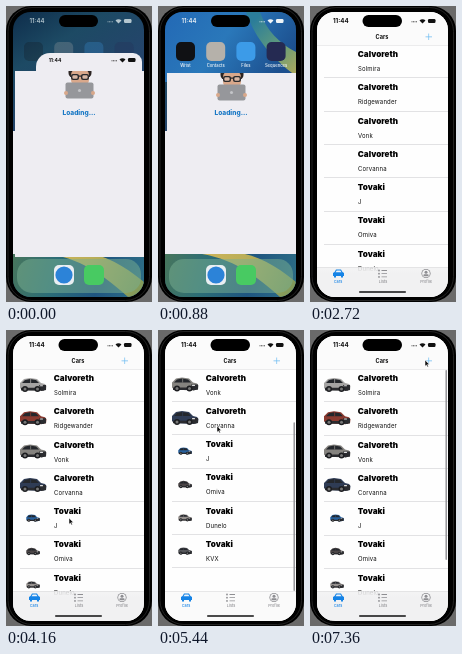
Recreate the animation shown at these times as an HTML page with a canvas. Size 146 by 296 pixels, loop 8000 ms.

```html
<!DOCTYPE html>
<html lang="en">
<head>
<meta charset="utf-8">
<style>
html, body { margin: 0; width: 100%; height: 100%; overflow: hidden; background: #000; }
canvas { display: block; width: 146px; height: 296px; }
</style>
</head>
<body>
<canvas id="stage"></canvas>
<script>
const canvas = document.getElementById('stage');
const c = canvas.getContext('2d');
const dpr = window.devicePixelRatio || 1;
canvas.width = 146 * dpr;
canvas.height = 296 * dpr;

const LOOP = 8000, STEP = 80, ROW = 33.3, TOP = 39, TAB = 261;
const SCREEN = [7, 6, 131, 285];
const BLUE = '#1583e6', GRAY = '#8e8e92';
const cars = [
  ['Calvoreth', 'Solmira', '#a5a4a3', 27],
  ['Calvoreth', 'Ridgewander', '#8a3a30', 27],
  ['Calvoreth', 'Vonk', '#85837f', 27],
  ['Calvoreth', 'Corvanna', '#2f3c55', 27],
  ['Tovaki', 'J', '#28609c', 14],
  ['Tovaki', 'Omiva', '#4b4546', 14],
  ['Tovaki', 'Dunelo', '#96918e', 14],
  ['Tovaki', 'KVX', '#55565a', 14],
];

// [time, x, y] of the pointer tip, and [time, offset] of the list
const pointerKeys = [[3120, 122, 150], [3600, 60, 214], [3760, 60, 214], [4160, 63, 188], [4400, 63, 188],
  [5200, 60, 100], [5440, 59, 96], [5600, 59, 96], [6240, 97, 115], [6400, 99, 117], [7200, 115, 32], [7360, 115, 30]];
const scrollKeys = [[4400, 0], [5200, 64], [5440, 67], [5600, 67], [6240, 0]];

const clamp = v => Math.max(0, Math.min(1, v));
const ease = v => v * v * (3 - 2 * v);
const span = (t, a, b) => clamp((t - a) / (b - a));

function track(keys, t) {
  let i = 0;
  while (i < keys.length - 2 && t >= keys[i + 1][0]) i++;
  const [a, b] = [keys[i], keys[i + 1]], k = ease(span(t, a[0], b[0]));
  return a.slice(1).map((v, n) => v + (b[n + 1] - v) * k);
}

function rect(x, y, w, h, fill, r = 0) {
  c.fillStyle = fill;
  c.beginPath();
  c.roundRect(x, y, w, h, r);
  c.fill();
}

function circle(x, y, r, fill) {
  c.fillStyle = fill;
  c.beginPath();
  c.arc(x, y, r, 0, 7);
  c.fill();
}

function poly(points, fill) {
  c.fillStyle = fill;
  c.beginPath();
  for (let i = 0; i < points.length; i += 2) c.lineTo(points[i], points[i + 1]);
  c.closePath();
  c.fill();
}

function text(s, x, y, size, fill, weight = 400, align = 'left', spacing = 0) {
  c.font = `${weight} ${size}px Inter, sans-serif`;
  c.letterSpacing = spacing + 'px';
  c.textAlign = align;
  c.textBaseline = 'middle';
  c.fillStyle = fill;
  c.fillText(s, x, y);
}

function layer(alpha, draw) {
  if (alpha <= 0) return;
  c.save();
  c.globalAlpha *= alpha;
  draw();
  c.restore();
}

function gradient(x0, y0, x1, y1, ...stops) {
  const g = c.createLinearGradient(x0, y0, x1, y1);
  stops.forEach((s, i) => g.addColorStop(i / (stops.length - 1), s));
  return g;
}

function statusIcons(x, y, color) {
  for (let i = 0; i < 4; i++) circle(x + i * 1.5, y + 0.8, 0.5, color);
  c.fillStyle = color;
  c.beginPath();
  c.moveTo(x + 10.5, y + 2.5);
  c.arc(x + 10.5, y + 2.5, 4.2, Math.PI * 1.25, Math.PI * 1.75);
  c.fill();
  rect(x + 16, y - 2, 7.5, 4, color, 1.2);
}

function phone() {
  rect(0, 0, 146, 296, '#6a6a6a');
  rect(0, 0, 146, 296, '#000', 25);
  c.strokeStyle = '#2c2c2c';
  c.lineWidth = 0.8;
  c.beginPath();
  c.roundRect(2, 1.5, 141.5, 293, 24);
  c.stroke();
}

function avatar(y) {
  c.save();
  c.beginPath();
  c.rect(56, y, 34, 28);
  c.clip();
  rect(62.5, y - 9, 23, 16, '#2c2523', 5);
  rect(65, y - 2, 18, 17, '#d9a88b', 6);
  for (const x of [65, 75]) {
    rect(x, y + 3, 8, 6, '#2a2a2d', 2);
    rect(x + 1.4, y + 4.3, 5.2, 3.4, '#d8b6a3', 1.2);
  }
  rect(72, y + 4.5, 4, 1.2, '#2a2a2d');
  rect(59.5, y + 11.5, 28, 16, '#96979b', 2);
  circle(73.5, y + 19.5, 1.5, '#c4c5c8');
  circle(60, y + 22, 2, '#d9a88b');
  circle(87, y + 22, 2, '#d9a88b');
  c.restore();
}

function wallpaper(k) {
  rect(...SCREEN, gradient(7, 6, 60, 90, '#0e2d4b', '#1d4a64', '#24456b'));
  layer(k, () => {
    rect(7, 6, 131, 70, gradient(7, 6, 110, 80, '#2369b5', '#2a78ba', '#1c4f8e'));
    c.fillStyle = gradient(90, 20, 138, 70, '#2b7d9a', '#5f9a7c', '#b0a95a');
    c.beginPath();
    c.moveTo(88, 6);
    c.bezierCurveTo(98, 34, 114, 52, 138, 70);
    c.lineTo(138, 46);
    c.bezierCurveTo(122, 38, 108, 24, 102, 6);
    c.fill();
  });

  // sweep behind the dock
  rect(7, 246, 131, 45, gradient(7, 246, 138, 280, '#48765c', '#2b6d77', '#1f5680', '#2d6e86'));
  c.fillStyle = gradient(30, 246, 130, 291, '#d6b75a', '#b9ae58', '#829a5a');
  c.beginPath();
  c.moveTo(30, 246);
  c.bezierCurveTo(70, 250, 92, 264, 122, 291);
  c.lineTo(138, 291);
  c.lineTo(138, 276);
  c.bezierCurveTo(116, 258, 100, 250, 78, 246);
  c.fill();
  rect(11, 253, 124, 34, 'rgba(122,176,146,.5)', 15);
}

function home(t) {
  const k = ease(span(t, 0, 480));
  wallpaper(k);
  rect(48, 259, 20, 20, '#e9eef2', 5);
  circle(58, 269, 8.6, '#2c83d8');
  rect(78, 259, 20, 20, '#48ca62', 5);

  const icons = [['Wrist', '#101114'], ['Contacts', '#b5b1aa'], ['Files', '#3c9be8'], ['Sequences', '#252a52']];
  icons.forEach(([name, color], i) => {
    const x = 27.5 + i * 30.2;
    layer(0.25 + 0.75 * k, () => rect(x - 9.5, 36, 19, 19, color, 5));
    layer(k, () => text(name, x, 60, 4.2, '#f4f8fa', 500, 'center'));
  });
  const white = k > 0.5 ? '#f0f5f8' : '#b5c7cf';
  text('11:44', 31, 15.5, 6, white, 600, 'center');
  statusIcons(102, 15, white);

  const y = 65 + 2 * k;
  layer(1 - k, () => {
    rect(30, 47 + 18 * k, 106, 30, '#eeedf2', [14, 9, 0, 0]);
    text('11:44', 49, 54.5 + 18 * k, 5, '#111', 700, 'center');
    statusIcons(106, 54 + 18 * k, '#111');
  });
  rect(9, y, 129, 251 - 3 * k - y, '#eeedf2');
  rect(7, 125, 2, 123, '#eeedf2');
  avatar(y);
  text('Loading...', 73, 107.3, 6.6, '#1878c5', 800, 'center');
  rect(53, 9, 39, 12, '#000', 6);
}

function car(x, y, w, color) {
  c.save();
  c.translate(x, y);
  c.scale(w / 27, w / 27);
  poly([-13, 3, -13, -2, -9, -6, -3, -7, 4, -6, 8, -2, 12, -1, 13.5, 1, 13, 5, 7, 6, -11, 5], color);
  poly([-11, -2, -8, -5, -3, -6, 3, -5, 6, -2], '#24272c');
  poly([6, 0, 13, 0, 13, 5, 8, 6], '#2b2c30');
  rect(7, 0.2, 3, 1.1, '#ddd', 0.5);
  rect(-2.7, -6, 0.8, 4, color);
  rect(-12, 2.8, 23, 2.6, '#2a2b2f');
  for (const wx of [-8, 4.5]) {
    circle(wx, 4, 3, '#1c1d20');
    circle(wx, 4, 1.5, '#777');
  }
  c.restore();
}

function list(t, offset) {
  const loaded = [span(t, 2800, 2960), span(t, 2880, 2960)];
  cars.forEach(([make, model, color, w], i) => {
    const y = TOP + i * ROW - offset;
    layer(loaded[i % 2], () => car(27, y + 16, w, color));
    text(make, 47.8, y + 9.5, 8.1, '#000', 900);
    text(model, 48, y + 24.2, 6, '#111', 400, 'left', 0.15);
    rect(14, Math.round(y + ROW - 1), 124, 1, '#e2e2e4');
  });
}

function tabBar(offset) {
  const over = offset > 45;
  rect(7, TAB, 131, 30, over ? '#fafafa' : gradient(0, TAB, 0, TAB + 7, 'rgba(241,241,242,.8)', '#f1f1f2'));
  rect(7, TAB, 131, 0.5, '#d6d6d8');
  poly([23, 270, 23, 267, 24.5, 266, 26, 263.5, 31, 263.5, 32.5, 266, 34, 267, 34, 270], BLUE);
  poly([25.5, 266.3, 26.7, 264.5, 30.3, 264.5, 31.5, 266.3], '#eef4fa');
  rect(24, 269, 2, 2.5, BLUE);
  rect(31, 269, 2, 2.5, BLUE);
  for (let i = 0; i < 3; i++) {
    circle(69, 264.5 + i * 3.2, 0.9, GRAY);
    rect(71.5, 264.1 + i * 3.2, 5.5, 0.8, GRAY);
  }
  circle(116, 267.5, 4.6, GRAY);
  circle(116, 267.5, 3.8, '#f3f3f4');
  circle(116, 266.2, 1.5, GRAY);
  rect(113.4, 268.3, 5.2, 2, GRAY, 1);
  text('Cars', 28, 275.8, 3.8, BLUE, 500, 'center');
  text('Lists', 73, 275.8, 3.8, GRAY, 500, 'center');
  text('Profile', 116, 275.8, 3.8, GRAY, 500, 'center');
  rect(49, 285.3, 47, 1.5, '#111', 0.7);
}

function app(t) {
  const [offset] = track(scrollKeys, t);
  rect(...SCREEN, '#fefefe');
  list(t, offset);
  rect(7, 6, 131, TOP - 6, '#fbfbfb');
  rect(7, TOP, 131, 0.5, '#dcdcde');
  text('11:44', 30.8, 15.5, 6.2, '#111', 700, 'center');
  rect(52.5, 9, 39.5, 12, '#000', 6);
  statusIcons(102, 15, '#111');
  text('Cars', 72, 31, 5.6, '#111', 700, 'center');
  rect(115.5, 30.5, 6.5, 0.7, '#6fbcf2');
  rect(118.4, 27.6, 0.7, 6.5, '#6fbcf2');
  tabBar(offset);
  if (t >= 4400) {
    const top = 40 + offset * 0.7 + Math.max(0, offset - 45) * 0.24;
    rect(135.5, top, 1.4, Math.min(190, TAB - top), '#8c8c90', 0.7);
  }
}

function pointer(t) {
  const [x, y] = track(pointerKeys, t);
  c.save();
  c.translate(x, y);
  poly([0, 0, 0, 6.2, 1.4, 5, 2.4, 7, 3.4, 6.5, 2.5, 4.6, 4.4, 4.5], '#111');
  c.strokeStyle = '#fff';
  c.lineWidth = 0.5;
  c.stroke();
  c.restore();
}

function draw(t) {
  c.setTransform(dpr, 0, 0, dpr, 0, 0);
  phone();
  c.save();
  c.beginPath();
  c.roundRect(...SCREEN, 18);
  c.clip();
  if (t < 1680) {
    home(t);
    layer(span(t, 1440, 1680), () => rect(...SCREEN, '#000'));
  } else if (t < 2720) {
    rect(...SCREEN, '#000');
    rect(49, 285.3, 47, 1.5, '#484848', 0.7);
  } else {
    app(t);
    if (t >= 3120) pointer(t);
  }
  c.restore();
}

function tick() {
  const t = performance.now() % LOOP;
  draw(Math.floor(t / STEP) * STEP);
  requestAnimationFrame(tick);
}
tick();
</script>
</body>
</html>
```
